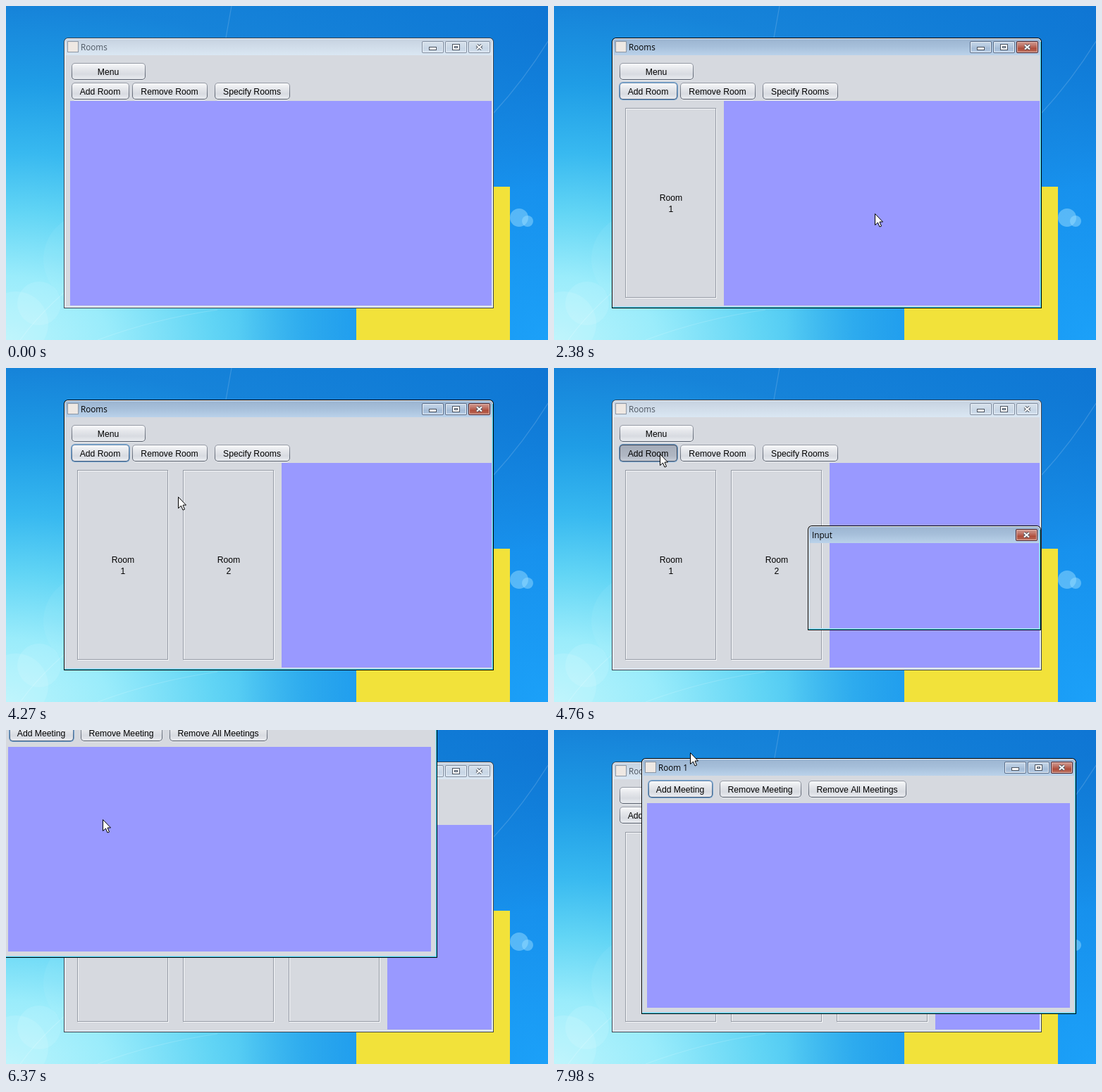
Write an HTML page with a canvas that moves like this. It is 769 px wide and 475 px high and loops after 8 s.

```html
<!DOCTYPE html>
<html lang="en">
<head>
<meta charset="utf-8">
<title>Rooms</title>
<style>
  html, body { margin: 0; width: 100%; height: 100%; overflow: hidden; background: #1480d6; }
  canvas { display: block; width: 769px; height: 475px; }
</style>
</head>
<body>
<canvas id="stage" width="769" height="475"></canvas>
<script>
const W = 769, H = 475, LOOP = 8000, STEP = 70;
const ctx = document.getElementById('stage').getContext('2d');
const UI = '12.2px "Liberation Sans", Arial, sans-serif';
const CAPTION = '11.7px "Open Sans", "Noto Sans", sans-serif';
const GREY = '#d6d9df', PURPLE = '#9999ff';

const dialogs = [
  { press: 1050, open: 1190, typed: 2240, close: 2380, room: '1' },
  { press: 3150, open: 3220, typed: 3710, close: 4270, room: '2' },
  { press: 4690, open: 4760, typed: 5180, close: 5460, room: '4' }
];
const ROOM_OPEN = 5810;

// Pointer and window paths: [time, x, y], straight between stops.
const pointerPath = [
  [280, 660, 460], [420, 428, 299], [560, 428, 299], [910, 147, 124],
  [1260, 147, 124], [1400, 191, 158], [1540, 455, 295], [2590, 455, 295],
  [2870, 150, 122], [3290, 150, 122], [3570, 244, 183], [4270, 244, 183],
  [4620, 150, 122], [4830, 150, 122], [5040, 250, 190], [5460, 250, 190],
  [5740, 155, 241], [6230, 155, 241], [6510, 119, 12], [6580, 110, -60],
  [7210, 322, -60], [7280, 330, -30], [7350, 350, -10], [7420, 378, 8],
  [7490, 413, 30], [7560, 439, 46], [7630, 451, 53], [7840, 451, 53], [7980, 193, 32]
];
const roomPath = [
  [0, -5, -40], [7350, -5, -40], [7420, 38, -13], [7490, 82, 14],
  [7560, 112, 33], [7630, 124, 40]
];

function along(path, t) {
  const next = path.findIndex(p => p[0] > t);
  if (next === 0) return [-99, -99];
  if (next < 0) return path[path.length - 1].slice(1);
  const [t0, x0, y0] = path[next - 1], [t1, x1, y1] = path[next];
  const k = (t - t0) / (t1 - t0);
  return [Math.round(x0 + (x1 - x0) * k), Math.round(y0 + (y1 - y0) * k)];
}

function rect(x, y, w, h, fill) {
  ctx.fillStyle = fill;
  ctx.fillRect(x, y, w, h);
}

function outline(x, y, w, h, color) {
  ctx.strokeStyle = color;
  ctx.lineWidth = 1;
  ctx.strokeRect(x + .5, y + .5, w - 1, h - 1);
}

function round(x, y, w, h, r, fill) {
  ctx.fillStyle = fill;
  ctx.beginPath();
  ctx.roundRect(x, y, w, h, r);
  ctx.fill();
}

function circle(x, y, r, fill) {
  ctx.fillStyle = fill;
  ctx.beginPath();
  ctx.arc(x, y, r, 0, 7);
  ctx.fill();
}

function shade(y, h, ...colors) {
  const g = ctx.createLinearGradient(0, y, 0, y + h);
  colors.forEach((c, i) => g.addColorStop(i / (colors.length - 1), c));
  return g;
}

// Elliptical light around (x, y), r high and r * stretch wide.
function glow(x, y, r, stretch, stops) {
  const g = ctx.createRadialGradient(0, 0, 0, 0, 0, r);
  stops.forEach(([at, c]) => g.addColorStop(at, c));
  ctx.save();
  ctx.translate(x, y);
  ctx.scale(stretch, 1);
  rect(-W, -H, 2 * W, 2 * H, g);
  ctx.restore();
}

function text(str, x, y, { font = UI, color = '#000', align = 'left' } = {}) {
  ctx.font = font;
  ctx.fillStyle = color;
  ctx.textAlign = align;
  ctx.fillText(str, x, y);
}

function desktop() {
  glow(0, 475, 700, 1.6, [[0, '#b8f4fc'], [.13, '#9aecfb'], [.26, '#62d5f5'], [.38, '#38b9f0'],
    [.52, '#1f9de6'], [.68, '#1683d9'], [.85, '#107bd6'], [1, '#0f74d3']]);
  glow(769, 475, 440, 1, [[0, 'rgba(28,164,252,.9)'], [.5, 'rgba(24,152,246,.7)'], [1, 'rgba(20,130,225,0)']]);
  circle(47, 423, 31, 'rgba(255,255,255,.1)');
  circle(14, 452, 46, 'rgba(255,255,255,.1)');
  circle(118, 360, 65, 'rgba(255,255,255,.05)');
  ctx.strokeStyle = 'rgba(255,255,255,.16)';
  ctx.lineWidth = 1.2;
  ctx.beginPath();
  ctx.moveTo(20, 475);
  ctx.quadraticCurveTo(60, 420, 130, 370);
  ctx.moveTo(130, 475);
  ctx.quadraticCurveTo(210, 445, 300, 432);
  ctx.moveTo(692, 152);
  ctx.quadraticCurveTo(735, 105, 769, 50);
  ctx.moveTo(320, 0);
  ctx.lineTo(312, 45);
  ctx.stroke();
  rect(497, 257, 218, 218, '#f2e23a');
  circle(728, 301, 13, 'rgba(150,220,255,.5)');
  circle(740, 306, 8, 'rgba(150,220,255,.5)');
}

function captionButton(kind, x, y, active) {
  const red = kind === 'close' && active;
  round(x, y, 31, 17, 2, red ? '#4c2028' : active ? '#596c88' : '#808d9f');
  round(x + 1, y + 1, 29, 15, 1, red ? '#e3b6ac' : '#e7eef6');
  rect(x + 2, y + 2, 27, 13, red ? shade(y, 16, '#d3a096', '#c37c70', '#ae4c3a', '#bd7563')
    : active ? shade(y, 16, '#c9d9eb', '#b9cce1', '#a5bcd7', '#b8cee6')
    : shade(y, 16, '#d8e2ed', '#d0dce8', '#c8d6e5', '#d5e2ef'));
  const ink = '#4b535f';
  if (kind === 'min') {
    rect(x + 10, y + 8, 11, 5, ink);
    rect(x + 11, y + 9, 9, 3, '#fff');
  } else if (kind === 'max') {
    rect(x + 10, y + 4, 11, 9, ink);
    rect(x + 11, y + 5, 9, 7, '#fff');
    rect(x + 13, y + 7, 5, 3, ink);
    rect(x + 14, y + 8, 3, 1, '#c8d5e4');
  } else {
    for (const [width, color] of [[4.2, ink], [2.2, '#fff']]) {
      ctx.strokeStyle = color;
      ctx.lineWidth = width;
      ctx.beginPath();
      ctx.moveTo(x + 12, y + 5.5); ctx.lineTo(x + 19, y + 11.5);
      ctx.moveTo(x + 19, y + 5.5); ctx.lineTo(x + 12, y + 11.5);
      ctx.stroke();
    }
  }
}

// Without paint, the inside shows whatever lies behind the window.
function frame(x, y, w, h, title, { active, painted = true, dialog = false }) {
  const edge = active ? '#b9d1ea' : '#d7e4f0';
  const glint = active ? '#3fd9f0' : '#eef3f8';
  const line = active ? '#000' : '#38404c';
  const bar = active ? shade(y, 25, '#9ab3cf', '#a6bfda', '#bad2ea') : shade(y, 25, '#c5d1df', '#d0dce9', '#dae7f3');
  const bottom = y + h, right = x + w, side = h - 25;
  round(x, y, w, 25, [6, 6, 0, 0], line);
  round(x + 1, y + 1, w - 2, 24, [5, 5, 0, 0], '#f3f7fb');
  round(x + 2, y + 2, w - 4, 23, [4, 4, 0, 0], bar);
  if (painted) rect(x + 3, y + 25, w - 6, h - 28, GREY);
  rect(x + 2, y + 25, 1, side - 2, edge);
  rect(right - 3, y + 25, 1, side - 2, edge);
  rect(x + 2, bottom - 3, w - 4, 1, edge);
  rect(x + 1, y + 25, 1, side - 1, '#f3f7fb');
  rect(right - 2, y + 6, 1, h - 7, glint);
  rect(x + 1, bottom - 2, w - 2, 1, glint);
  rect(x, y + 25, 1, side, line);
  rect(right - 1, y + 25, 1, side, line);
  rect(x, bottom - 1, w, 1, line);
  if (!dialog) {
    rect(x + 5, y + 5, 16, 16, '#8d97a4');
    rect(x + 6, y + 6, 14, 14, '#eee8e3');
    captionButton('min', right - 102, y + 5, active);
    captionButton('max', right - 69, y + 5, active);
  }
  captionButton('close', right - 36, y + 5, active);
  text(title, x + (dialog ? 6 : 24), y + 18, { font: CAPTION, color: active ? '#000' : '#4d5661' });
}

function button(label, x, y, w, { focus, pressed, hover } = {}) {
  const h = 24;
  if (focus) round(x - 1, y - 1, w + 2, h + 2, 6, '#6f9fcb');
  else round(x, y + 1, w, h, 5, 'rgba(255,255,255,.5)');
  round(x, y, w, h, 5, pressed ? shade(y, h, '#3a4356', '#4a5569')
    : focus ? shade(y, h, '#7796b8', '#41597a') : shade(y, h, '#989da7', '#525a68'));
  const fill = pressed ? shade(y, h, '#a3aab7', '#abb2be', '#b0b7c3', '#c8ced8')
    : hover ? shade(y, h, '#ffffff', '#f2f4f7', '#e6e9ee', '#fafbfd')
    : shade(y, h, '#fafbfc', '#e6e8ec', '#d8dbe1', '#eceef2');
  round(x + 1, y + 1, w - 2, h - 2, 4, fill);
  text(label, x + w / 2 - .5, y + 17, { align: 'center' });
}

function roomCard(index, label) {
  const x = 91 + index * 150;
  rect(x, 135, 150, 291, GREY);
  outline(x + 11, 146, 129, 270, '#f7f8fa');
  outline(x + 10, 145, 129, 270, '#949aa4');
  text('Room', x + 75, 277, { align: 'center' });
  text(label, x + 75, 293, { align: 'center' });
}

function mainWindow(t, dialog, [px, py]) {
  const active = t >= 1050 && t < ROOM_OPEN && !dialog;
  const pressed = dialogs.some(d => t >= d.press && t < d.open + STEP);
  const over = (x, w) => active && px >= x && px < x + w && py >= 109 && py < 133;
  frame(82, 45, 610, 385, 'Rooms', { active });
  button('Menu', 93, 81, 105);
  button('Add Room', 93, 109, 82, { focus: active || pressed, pressed, hover: over(93, 82) });
  button('Remove Room', 179, 109, 107, { hover: over(179, 107) });
  button('Specify Rooms', 296, 109, 107, { hover: over(296, 107) });
  rect(91, 135, 598, 291, PURPLE);
  dialogs.filter(d => t >= d.close).forEach((d, i) => roomCard(i, d.room));
}

function inputDialog(t, d) {
  const painted = t >= d.open + STEP;
  frame(360, 224, 331, 149, 'Input', { active: true, painted, dialog: true });
  if (!painted) return;
  circle(402, 288, 22, '#3f6f9d');
  circle(402, 287, 20, shade(266, 42, '#8fb6d8', '#4d82b4'));
  text('?', 402, 298, { font: 'bold 30px "Liberation Sans", sans-serif', color: '#fff', align: 'center' });
  text('Please specify the room number:', 441, 276);
  round(440, 282, 235, 29, 3, '#73a4d1');
  rect(442, 284, 231, 25, '#fff');
  const typed = t >= d.typed;
  if (typed) text(d.room, 447, 301);
  if (typed || Math.floor((t - d.open) / 490) % 2 === 0) rect(typed ? 454 : 447, 289, 1, 16, '#000');
  button('OK', 524, 329, 72);
  button('Cancel', 602, 329, 72);
}

function roomWindow(t) {
  const [x, y] = along(roomPath, t);
  const painted = t >= ROOM_OPEN + STEP;
  frame(x, y, 617, 364, 'Room 1', { active: true, painted });
  if (!painted) return;
  button('Add Meeting', x + 10, y + 32, 91, { focus: true });
  button('Remove Meeting', x + 111, y + 32, 116);
  button('Remove All Meetings', x + 237, y + 32, 139);
  rect(x + 8, y + 64, 600, 291, PURPLE);
}

function arrow(x, y) {
  const shape = [[0, 0], [0, 16], [4, 12.5], [6.5, 18.5], [9, 17.5], [6.5, 11.5], [11, 11.5]];
  ctx.beginPath();
  shape.forEach(([dx, dy]) => ctx.lineTo(x + dx + .5, y + dy + .5));
  ctx.closePath();
  ctx.fillStyle = '#fff';
  ctx.fill();
  ctx.strokeStyle = '#000';
  ctx.lineWidth = 1;
  ctx.stroke();
}

function textCursor(x, y) {
  rect(x, y, 1, 16, '#000');
  rect(x - 3, y, 7, 1, '#000');
  rect(x - 3, y + 15, 7, 1, '#000');
}

function draw(now) {
  const t = Math.floor(now % LOOP / STEP) * STEP;
  const dialog = dialogs.find(d => t >= d.open && t < d.close);
  const pointer = along(pointerPath, t);
  desktop();
  mainWindow(t, dialog, pointer);
  if (dialog) inputDialog(t, dialog);
  if (t >= ROOM_OPEN) roomWindow(t);
  if (t >= 1540 && t < 2380) textCursor(457, 288);
  else arrow(...pointer);
}

const start = performance.now();
function tick() {
  draw(performance.now() - start);
  requestAnimationFrame(tick);
}
tick();
</script>
</body>
</html>
```
